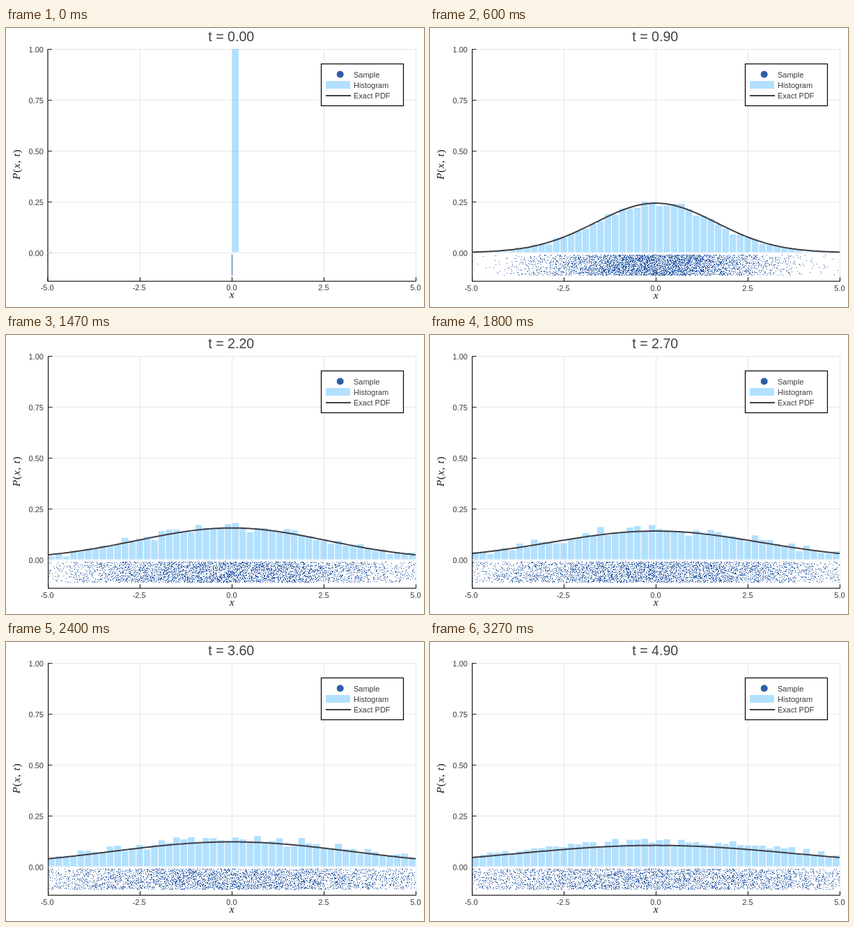
Animation, 600 px wide and 400 px high, one loop 3340 ms. Source, as an HTML page with a canvas:

```html
<!DOCTYPE html>
<html lang="en">
<head>
<meta charset="utf-8">
<title>Diffusion of a sample</title>
<style>
  html, body { margin: 0; width: 100%; height: 100%; overflow: hidden; background: #fff; }
  canvas, svg { position: absolute; left: 0; top: 0; width: 600px; height: 400px; }
  text { font: 11px "Liberation Sans", Arial, sans-serif; fill: #3c3c3c; }
  #title { font-size: 19.6px; fill: #404040; }
  .math { font: italic 15.5px "Liberation Serif", Times, serif; letter-spacing: .7px; fill: #1c1c1c; }
  .math tspan { font-style: normal; }
  .mid { text-anchor: middle; }
  .end { text-anchor: end; }
</style>
</head>
<body>
<canvas id="plot" width="600" height="400"></canvas>
<svg id="labels" viewBox="0 0 600 400">
  <text id="title" class="mid" x="323.3" y="19">t = 0.00</text>
  <text class="math mid" transform="translate(19.5 195.5) rotate(-90)">P<tspan>(</tspan>x<tspan>,</tspan> t<tspan>)</tspan></text>
  <g id="xLabels"><text class="math mid" x="324.5" y="387">x</text></g>
  <g id="yLabels"></g>
  <g>
    <rect x="452.5" y="51.5" width="118" height="60" fill="#fff" stroke="#000" stroke-width="1.2"/>
    <circle cx="479.7" cy="66.5" r="5" fill="#2f5fa8"/>
    <rect x="459" y="76" width="35" height="11" fill="#b3e0ff"/>
    <path d="M459 97H495" stroke="#3f3f47" stroke-width="2"/>
    <text x="499" y="71">Sample</text>
    <text x="499" y="86">Histogram</text>
    <text x="499" y="101">Exact PDF</text>
  </g>
</svg>
<script>
const STEPS = 50, DT = 0.1, VARIANCE_RATE = 3, COUNT = 5000;
const BIN = 0.2, BINS = 50, LOOP = 3340;
const TOP = 30, BASE = 322, FLOOR = 363, RIGHT = 588, UNIT = 52.8;
const ctx = document.getElementById("plot").getContext("2d");
const title = document.getElementById("title");
const xLabels = document.getElementById("xLabels");
const yLabels = document.getElementById("yLabels");

const px = x => 324 + x * UNIT;
const py = y => BASE - y * (BASE - TOP);
const range = (n, f) => Array.from({ length: n }, (_, i) => f(i));
const xTicks = range(5, i => i * 2.5 - 5);
const yTicks = range(5, i => i / 4);

let seed = 20417;
function random() {
  seed = (seed + 0x6d2b79f5) | 0;
  let n = Math.imul(seed ^ (seed >>> 15), 1 | seed);
  n = (n + Math.imul(n ^ (n >>> 7), 61 | n)) ^ n;
  return ((n ^ (n >>> 14)) >>> 0) / 4294967296;
}
const gauss = () => Math.sqrt(-2 * Math.log(1 - random())) * Math.cos(2 * Math.PI * random());

// Brownian walkers, all starting at zero
const heights = range(COUNT, () => 325 + Math.floor(random() * 30));
const walks = [new Float64Array(COUNT)];
const jump = Math.sqrt(VARIANCE_RATE * DT);
while (walks.length < STEPS) walks.push(walks[walks.length - 1].map(x => x + jump * gauss()));

// Normalised over the visible range
function histogram(walk) {
  const bars = new Array(BINS).fill(0);
  let seen = 0;
  for (const x of walk) {
    const i = Math.floor((x + 5) / BIN);
    if (i >= 0 && i < BINS) { bars[i]++; seen++; }
  }
  return bars.map(n => n / (seen * BIN));
}
const histograms = walks.map(histogram);

function line(color, width, ...points) {
  ctx.strokeStyle = color;
  ctx.lineWidth = width;
  ctx.beginPath();
  points.forEach(([x, y]) => ctx.lineTo(x, y));
  ctx.stroke();
}

function drawGrid() {
  for (const x of xTicks) line("#e7e7e7", 1, [px(x) + .5, TOP], [px(x) + .5, FLOOR]);
  for (const y of yTicks) line("#e7e7e7", 1, [60, py(y) + .5], [RIGHT, py(y) + .5]);
}

function drawAxes(left) {
  const ink = "#202020", wide = 1.25;
  line(ink, wide, [left, TOP], [left, FLOOR], [RIGHT + .5, FLOOR]);
  for (const x of xTicks) {
    const at = Math.max(left, px(x) + .5 * (x > -5));
    line(ink, wide, [at, FLOOR], [at, FLOOR - 5.5]);
  }
  for (const y of yTicks) line(y ? ink : "#b4b4b4", 1, [left, py(y) + .5], [left + 6, py(y) + .5]);
}

function drawBars(bars) {
  bars.forEach((h, i) => {
    if (!h) return;
    const box = [px(i * BIN - 5), py(h), BIN * UNIT, BASE - py(h)];
    ctx.fillStyle = "rgba(0,152,255,.3)";
    ctx.fillRect(...box);
    ctx.strokeStyle = "#fff";
    ctx.lineWidth = .9;
    ctx.strokeRect(...box);
  });
}

function drawSample(walk) {
  ctx.fillStyle = "#2f5fa8";
  walk.forEach((x, i) => {
    if (Math.abs(x) <= 5) ctx.fillRect(Math.floor(px(x)), heights[i], 1, 1);
  });
}

function drawCurve(t) {
  const v = VARIANCE_RATE * t;
  const pdf = x => Math.exp(-x * x / (2 * v)) / Math.sqrt(2 * Math.PI * v);
  ctx.lineJoin = "round";
  line("#3f3f47", 2, ...range(201, i => i / 20 - 5).map(x => [px(x), py(pdf(x))]));
}

function draw(step) {
  const t = step * DT;
  ctx.clearRect(0, 0, 600, 400);
  drawGrid();
  drawAxes(step ? 60.6 : 60);
  ctx.save();
  ctx.beginPath();
  ctx.rect(61, TOP, RIGHT - 61, FLOOR - TOP);
  ctx.clip();
  drawBars(histograms[step]);
  drawSample(walks[step]);
  if (step) drawCurve(t);
  ctx.restore();
  title.textContent = "t = " + t.toFixed(2);
  xLabels.setAttribute("transform", `translate(0 ${step ? 1 : 0})`);
}

function addLabel(parent, text, x, y, align) {
  const node = document.createElementNS("http://www.w3.org/2000/svg", "text");
  node.setAttribute("x", x);
  node.setAttribute("y", y);
  node.setAttribute("class", align);
  node.textContent = text;
  parent.append(node);
}
for (const x of xTicks) addLabel(xLabels, x.toFixed(1), px(x) - (x < 0 ? .8 : 0), 376, "mid");
for (const y of yTicks) addLabel(yLabels, y.toFixed(2), 54, py(y) + 4.5, "end");

// 15 steps a second, on a 10 ms clock
const startOf = step => Math.round(step * 20 / 3) * 10;
const begin = performance.now();
let shown = -1;

function tick() {
  const ms = (performance.now() - begin) % LOOP;
  let step = STEPS - 1;
  while (startOf(step) > ms) step--;
  if (step !== shown) draw(shown = step);
  requestAnimationFrame(tick);
}
tick();
</script>
</body>
</html>
```
